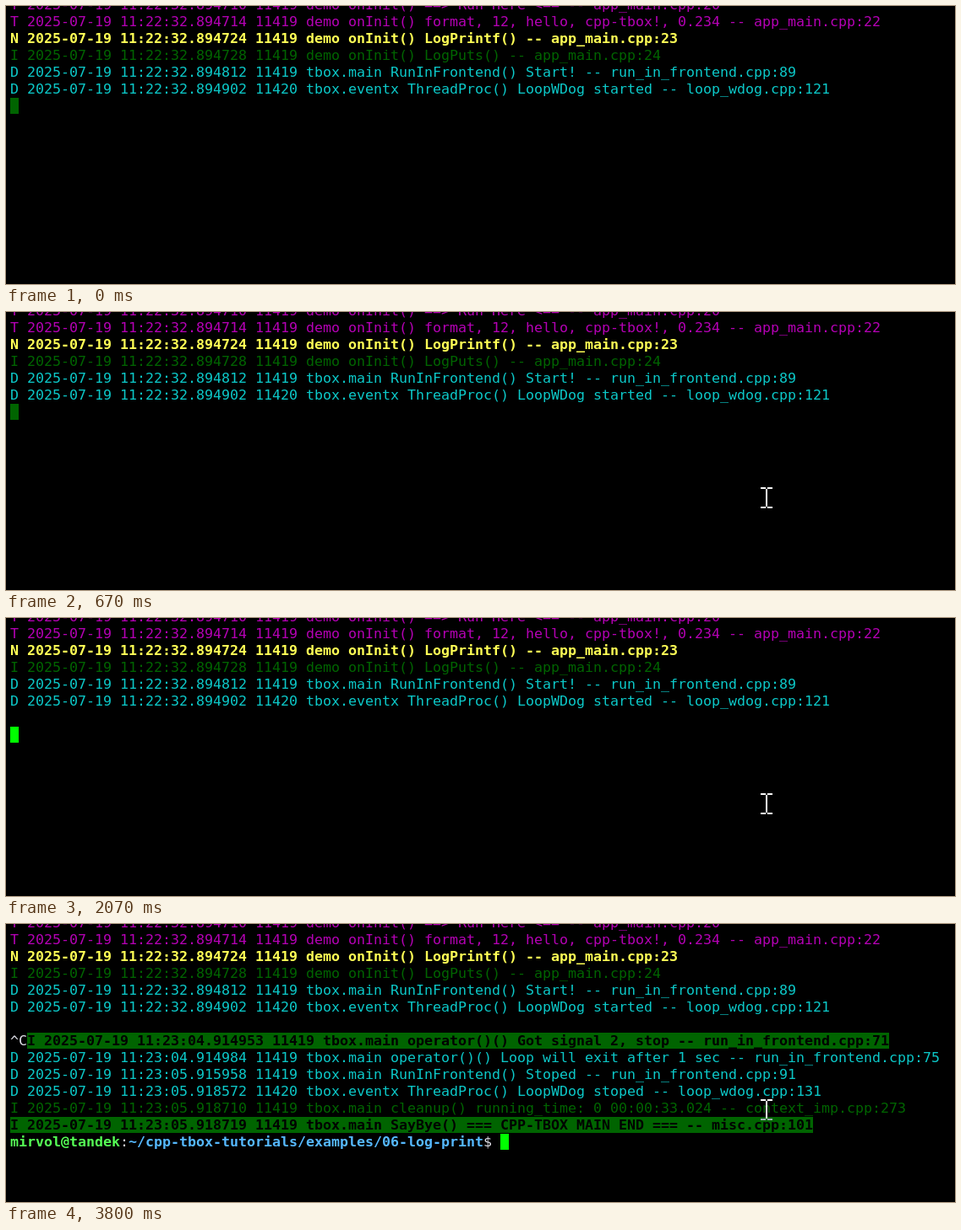
An HTML page that plays this animation: 1123 by 330 pixels, repeating every 5180 ms.

```html
<!DOCTYPE html>
<html lang="en">
<head>
<meta charset="utf-8">
<title>Log output in a terminal</title>
<style>
  :root { --loop: 5180ms step-end infinite; --green: #006400; }
  html, body { margin: 0; width: 100%; height: 100%; overflow: hidden; background: #000; }
  /* 16.61px gives a 10px character cell */
  #term {
    position: relative; width: 1123px; height: 330px; overflow: hidden;
    font: 16.61px/19px "DejaVu Sans Mono", monospace;
    font-variant-ligatures: none; color: #e0e0e8;
  }
  #term > * { position: absolute; }
  .line { left: 5px; top: calc(-11px + 20px * var(--r)); height: 19px; white-space: pre; }

  .T { color: #b400b4; }
  .N { color: #ffff55; font-weight: bold; }
  .I { color: var(--green); }
  .D { color: #0cc8c8; }
  .mark { color: #000; background: var(--green); font-weight: bold; }
  .user { color: #55ff55; font-weight: bold; }
  .path { color: #55b8ff; font-weight: bold; }

  .signal { animation: signal var(--loop); }
  .stop { animation: stop var(--loop); }
  .end { animation: end var(--loop); }
  @keyframes signal { 0% { visibility: hidden } 52.702%, 100% { visibility: visible } }
  @keyframes stop { 0% { visibility: hidden } 72.007%, 100% { visibility: visible } }
  @keyframes end { 0% { visibility: hidden } 73.359%, 100% { visibility: visible } }

  #cursor {
    left: 5px; top: 109px; width: 10px; height: 19px;
    animation: cursor var(--loop);
  }
  @keyframes cursor {
    0% { background: var(--green); box-shadow: none; transform: none }
    19.691% { background: #0f0; box-shadow: inset 0 0 0 1px var(--green); transform: none }
    39.961% { background: #0f0; box-shadow: none; transform: translateY(20px) }
    52.702% { background: #0f0; box-shadow: none; transform: translateY(60px) }
    72.007% { background: #0f0; box-shadow: none; transform: translateY(80px) }
    73.359%, 100% { background: #0f0; box-shadow: none; transform: translate(580px, 140px) }
  }

  #pointer { left: 893px; top: 208px; animation: pointer var(--loop); }
  @keyframes pointer {
    0% { visibility: hidden; transform: translate(60px, 38px) }
    2.509% { visibility: visible; transform: translate(60px, 38px) }
    3.861% { visibility: visible; transform: translate(18px, 11px) }
    5.212%, 100% { visibility: visible; transform: none }
  }
  #foot { animation: foot var(--loop); }
  @keyframes foot { 0% { fill: #fff } 73.359%, 100% { fill: #9cb0b0 } }

  #click {
    left: 879px; top: 201px; width: 36px; height: 36px; border-radius: 50%;
    background: rgba(255, 255, 0, .48); animation: click var(--loop);
  }
  @keyframes click {
    0% { visibility: hidden }
    9.073% { visibility: visible }
    12.934%, 100% { visibility: hidden }
  }
</style>
</head>
<body>
<div id="term">
  <div class="line T" style="--r:0">T 2025-07-19 11:22:32.894710 11419 demo onInit() ==&gt; Run Here &lt;== -- app_main.cpp:20</div>
  <div class="line T" style="--r:1">T 2025-07-19 11:22:32.894714 11419 demo onInit() format, 12, hello, cpp-tbox!, 0.234 -- app_main.cpp:22</div>
  <div class="line N" style="--r:2">N 2025-07-19 11:22:32.894724 11419 demo onInit() LogPrintf() -- app_main.cpp:23</div>
  <div class="line I" style="--r:3">I 2025-07-19 11:22:32.894728 11419 demo onInit() LogPuts() -- app_main.cpp:24</div>
  <div class="line D" style="--r:4">D 2025-07-19 11:22:32.894812 11419 tbox.main RunInFrontend() Start! -- run_in_frontend.cpp:89</div>
  <div class="line D" style="--r:5">D 2025-07-19 11:22:32.894902 11420 tbox.eventx ThreadProc() LoopWDog started -- loop_wdog.cpp:121</div>
  <div class="line signal" style="--r:7">^C<span class="mark">I 2025-07-19 11:23:04.914953 11419 tbox.main operator()() Got signal 2, stop -- run_in_frontend.cpp:71</span></div>
  <div class="line D signal" style="--r:8">D 2025-07-19 11:23:04.914984 11419 tbox.main operator()() Loop will exit after 1 sec -- run_in_frontend.cpp:75</div>
  <div class="line D stop" style="--r:9">D 2025-07-19 11:23:05.915958 11419 tbox.main RunInFrontend() Stoped -- run_in_frontend.cpp:91</div>
  <div class="line D end" style="--r:10">D 2025-07-19 11:23:05.918572 11420 tbox.eventx ThreadProc() LoopWDog stoped -- loop_wdog.cpp:131</div>
  <div class="line I end" style="--r:11">I 2025-07-19 11:23:05.918710 11419 tbox.main cleanup() running_time: 0 00:00:33.024 -- context_imp.cpp:273</div>
  <div class="line end" style="--r:12"><span class="mark">I 2025-07-19 11:23:05.918719 11419 tbox.main SayBye() === CPP-TBOX MAIN END === -- misc.cpp:101</span></div>
  <div class="line end" style="--r:13"><span class="user">mirvol@tandek</span>:<span class="path">~/cpp-tbox-tutorials/examples/06-log-print</span>$</div>
  <div id="cursor"></div>
  <svg id="pointer" width="14" height="25" fill="#fff" shape-rendering="crispEdges">
    <path d="M0 0h6v2h-6zM8 0h6v2h-6zM6 2h2v21h-2z"/>
    <path id="foot" d="M0 23h6v2h-6zM8 23h6v2h-6z"/>
  </svg>
  <div id="click"></div>
</div>
</body>
</html>
```
